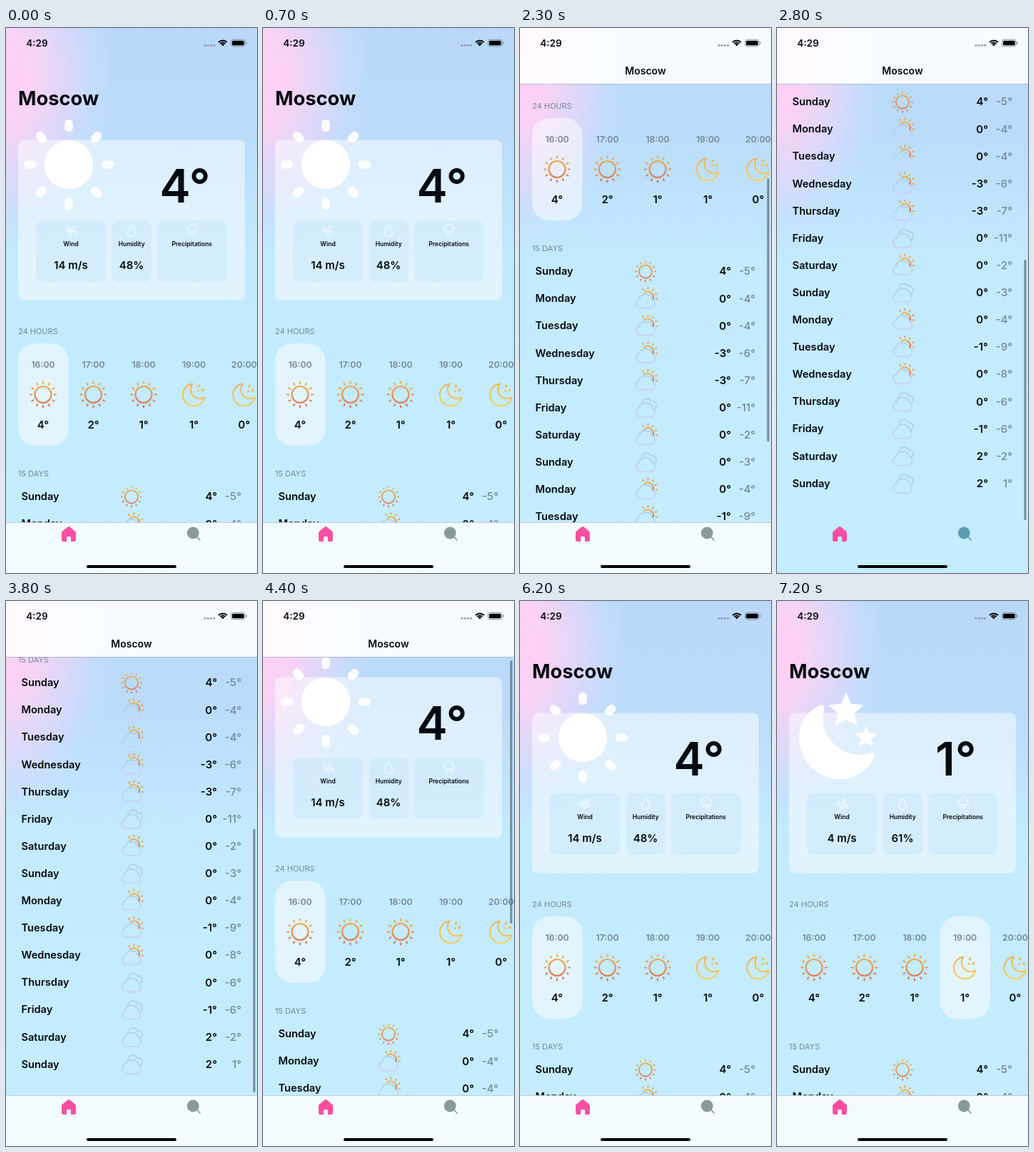
These frames come from a looping animation (352 px wide and 762 px high, 8 s). An HTML page:

```html
<!DOCTYPE html>
<html lang="en">
<head>
<meta charset="utf-8">
<title>Weather</title>
<style>
  html, body { margin: 0; width: 100%; height: 100%; overflow: hidden; background: #c5edff; }
  svg { display: block; width: 352px; height: 762px; font-family: Inter, "Liberation Sans", sans-serif; }
</style>
</head>
<body>
<svg id="stage" viewBox="0 0 352 762"></svg>
<script>
const LOOP = 8000;
const GREY = '#75879a';

// Markup helpers: text is centred vertically on y.
const text = (x, y, str, size, weight = 600, anchor = 'middle', fill = '#050a10') =>
  `<text x="${x}" y="${y + size * 0.362}" font-size="${size}" font-weight="${weight}" text-anchor="${anchor}" fill="${fill}">${str}</text>`;
const rect = (x, y, w, h, r, fill, more = '') =>
  `<rect x="${x}" y="${y}" width="${w}" height="${h}" rx="${r}" fill="${fill}" ${more}/>`;
const line = (d, stroke, width, more = '') =>
  `<path d="${d}" fill="none" stroke="${stroke}" stroke-width="${width}" stroke-linecap="round" stroke-linejoin="round" ${more}/>`;
const at = (x, y, body, scale = 1) =>
  `<g transform="translate(${x} ${y}) scale(${scale})">${body}</g>`;
const polar = (r, deg) => {
  const a = deg * Math.PI / 180;
  return `${(r * Math.cos(a)).toFixed(2)},${(r * Math.sin(a)).toFixed(2)}`;
};
const rays = (from, to, angles) => angles.map(a => `M${polar(from, a)}L${polar(to, a)}`).join('');
const range = n => [...Array(n).keys()];
const star = (x, y, r) => {
  const points = range(10).map(i => polar(i % 2 ? r * 0.46 : r, i * 36 - 90)).join(' ');
  return at(x, y, `<polygon points="${points}" fill="#fff" stroke="#fff" stroke-linejoin="round"/>`);
};

// Forecast icons, centred on 0,0
const CLOUD = 'M-8,13H8A6.5 6.5 0 0 0 10,1A10 10 0 0 0 -9,0A7 7 0 0 0 -8,13Z';
const sun = line('M11.5,0A11.5 11.5 0 1 1 -11.5,0A11.5 11.5 0 1 1 11.5,0Z' +
  rays(15.8, 18, range(12).map(i => i * 30)), 'url(#warm)', 2.2);
const moon = line('M-2,-15A15.5 15.5 0 1 0 15,4A13 13 0 0 1 -2,-15Z', 'url(#gold)', 2.1) +
  [[7, -12, 1.9], [12, -6, 1.9], [6, -5, 1.6]].map(([x, y, r]) => `<circle cx="${x}" cy="${y}" r="${r}" fill="#f3bd57"/>`).join('');
const cloud = line(CLOUD, 'url(#mist)', 1.6);
const icons = {
  sun: at(0, 0, sun, 0.79),
  partly: cloud + at(3, -2,
    line(`M${polar(8, -125)}A8 8 0 0 1 ${polar(8, 15)}`, 'url(#warm)', 2.1) +
    line(rays(12, 13.2, [-120, -88, -55, -22, 10]), '#eba65a', 2.2)),
  cloudy: line('M-5,-7A7 7 0 0 1 8,-9A5.6 5.6 0 0 1 11,2', '#b1cfe8', 1.6) + cloud
};

// Large card artwork
const bigSun = `<g fill="#fff"><circle cx="88" cy="191" r="34.2"/>` + range(8).map(i =>
  rect(82.2, 128, 11.6, 17, 5.5, '#fff', `opacity=".92" transform="rotate(${i * 45} 88 191)"`)).join('') + '</g>';
const bigMoon = '<path fill="#fff" d="M60,146C40,155 31,173 31,191C31,224 57,249 89,249C110,249 128,236 136,219' +
  'C138,214 134,211 129,213C110,219 92,212 80,200C66,187 62,170 66,152C67,147 64,144 60,146Z"/>' +
  star(97, 153.5, 25) + star(125, 190.5, 15.5);

const HOUR_X = [52, 122.5, 193, 263.5, 334];
const reading = (id, art, degrees, wind, humidity, hour) => `<g id="${id}">` + art +
  text(251, 220, degrees, 65) + text(91, 331.5, wind, 15) + text(176, 331.5, humidity, 15) +
  rect(HOUR_X[hour] - 35, 441, 70.5, 143, 24, '#fff', 'fill-opacity=".52"') + '</g>';

const panel = (x, w, label) => rect(x, 269, w, 86, 9, '#b9e0fa', 'fill-opacity=".36"') +
  text(x + w / 2, 302, label, 8.5);
const smallIcons =
  at(91, 283, line('M-7,-1.5H3A2 2 0 1 0 1,-4M-5,-4H-3.5M-7,1H5.5A2 2 0 1 1 4,4M-4,3.5H0A1.7 1.7 0 1 1 -1.5,6', '#fff', 1.1)) +
  at(176, 283, line('M0,-7.5C3,-3.5 5.5,0 5.5,3A5.5 5.5 0 0 1 -5.5,3C-5.5,0 -3,-3.5 0,-7.5Z', '#fff', 1.1)) +
  at(261, 282, line(CLOUD, '#fff', 2, 'transform="translate(0 -4) scale(.55)"') +
    line('M-2.5,5.5L-3.5,7.5M1,6L0,8.5M4.5,5.5L3.5,7.5', '#fff', 1.1));

const hours = ['16:00 4', '17:00 2', '18:00 1', '19:00 1', '20:00 0'].map((entry, i) => {
  const [time, degrees] = entry.split(' ');
  return text(HOUR_X[i], 470.5, time, 12.3, 600, 'middle', GREY) +
    at(HOUR_X[i], 512.5, i < 3 ? sun : moon) + text(HOUR_X[i], 555, degrees + '°', 15);
}).join('');

const week = ['Sunday', 'Monday', 'Tuesday', 'Wednesday', 'Thursday', 'Friday', 'Saturday'];
const highs = [4, 0, 0, -3, -3, 0, 0, 0, 0, -1, 0, 0, -1, 2, 2];
const lows = [-5, -4, -4, -6, -7, -11, -2, -3, -4, -9, -8, -6, -6, -2, 1];
const sky = 'sppppcpcpppcccc';
const kinds = { s: 'sun', p: 'partly', c: 'cloudy' };
const days = highs.map((high, i) => {
  const y = 655 + i * 38.1;
  return text(21.5, y, week[i % 7], 14.6, 600, 'start') + at(176, y + 0.5, icons[kinds[sky[i]]]) +
    text(296, y, high + '°', 15, 600, 'end') + text(330, y, lows[i] + '°', 15, 500, 'end', GREY);
}).join('');

const gradient = (id, top, bottom) =>
  `<linearGradient id="${id}" x2="0" y2="1"><stop stop-color="${top}"/><stop offset="1" stop-color="${bottom}"/></linearGradient>`;

const stage = document.getElementById('stage');
stage.innerHTML = `<defs>
  ${gradient('warm', '#efb552', '#da7660')}${gradient('gold', '#f2b255', '#f3d069')}${gradient('mist', '#abcdeb', '#d2cdec')}
  <linearGradient id="air" x2="0" y2="1">
    <stop stop-color="#bad9fa"/><stop offset=".2" stop-color="#badcfa"/>
    <stop offset=".42" stop-color="#c3eafe"/><stop offset="1" stop-color="#c5edff"/>
  </linearGradient>
  <radialGradient id="blush">
    <stop stop-color="#ffcff3"/><stop offset=".3" stop-color="#fbd2f5" stop-opacity=".95"/>
    <stop offset=".65" stop-color="#e3d8fa" stop-opacity=".65"/><stop offset="1" stop-color="#c4e0fc" stop-opacity="0"/>
  </radialGradient>
  <clipPath id="view"><rect id="window" width="352"/></clipPath></defs>` +
  rect(0, 0, 352, 762, 0, 'url(#air)') +
  '<ellipse cx="-6" cy="70" rx="160" ry="245" fill="url(#blush)"/>' +
  `<g clip-path="url(#view)"><g id="content">
    <g id="heading">${text(17, 98.5, 'Moscow', 27.3, 700, 'start')}</g>` +
    rect(17, 156.5, 318, 224, 8, '#fff', 'fill-opacity=".5"') +
    panel(42, 98, 'Wind') + panel(148.5, 55.5, 'Humidity') + panel(212, 97.5, 'Precipitations') + smallIcons +
    reading('day', bigSun, '4°', '14 m/s', '48%', 0) + reading('night', bigMoon, '1°', '4 m/s', '61%', 3) +
    text(17, 424, '24 HOURS', 11, 400, 'start', GREY) + hours +
    text(17, 623.5, '15 DAYS', 11, 400, 'start', GREY) + days + '</g></g>' +
  `<g id="nav">${rect(0, 0, 352, 78, 0, '#fff', 'fill-opacity=".88"')}${rect(0, 78, 352, 0.7, 0, '#a3b2be')}</g>` +
  `<g id="title">${text(176, 59.5, 'Moscow', 14)}</g>` +
  `<g id="tab">${rect(0, 691, 352, 71, 0, '#fff', 'fill-opacity=".8"')}${rect(0, 691, 352, 0.7, 0, '#a9bac3')}</g>` +
  rect(346.5, 0, 3, 0, 1.5, '#566674', 'id="thumb"') +
  // Status bar
  text(43.5, 21, '4:29', 13.5) +
  range(4).map(i => `<circle cx="${279 + i * 4.2}" cy="24.3" r="1.5" fill="#8f9bab"/>`).join('') +
  at(304, 25.5, '<path d="M0,0L-2.3,-2.4A3.3 3.3 0 0 1 2.3,-2.4Z"/>' +
    [4.9, 8.1].map(r => `<path d="M${polar(r, -137)}A${r} ${r} 0 0 1 ${polar(r, -43)}" fill="none" stroke="#000" stroke-width="2"/>`).join('')) +
  rect(315.5, 16.2, 19.8, 9.6, 3, 'none', 'stroke="#7d8793" stroke-width=".9"') +
  rect(317, 17.7, 16.8, 6.6, 1.6, '#000') + rect(336.3, 19.3, 1.3, 3.4, 0.6, '#7d8793') +
  // Tab icons and home indicator
  '<path fill="#fb4fa2" d="M86.5,697.6Q88,696.4 89.5,697.6L97,703.8Q98,704.7 98,706V715.5Q98,718 95.5,718H91V712.5Q91,711 89.5,711H86.5Q85,711 85,712.5V718H80.5Q78,718 78,715.5V706Q78,704.7 79,703.8Z"/>' +
  `<g id="search"><circle cx="262.3" cy="706" r="8.4"/>${line('M268.5,712.2L272,715.8', 'currentColor', 1.7)}</g>` +
  rect(113, 751, 126, 4, 2, '#000');

const parts = {};
stage.querySelectorAll('[id]').forEach(el => parts[el.id] = el);
const set = (id, attrs) => {
  for (const key in attrs) parts[id].setAttribute(key, attrs[key]);
};

// Scroll offsets at 100 ms spacing: flick down with bounce, flick up with bounce
const flickDown = [54, 130, 225, 315, 395, 460, 510, 541, 552, 551, 549, 547.5, 546.5, 546];
const flickUp = [541, 480, 395, 295, 195, 110, 50, 15, -4, -7, -5.5, -3.5, -2, -1, -0.4, 0];
const pick = (list, t, start) => list[Math.min(list.length - 1, (t - start) / 100)];
const scrollAt = t => t < 2000 ? 0 : t < 3800 ? pick(flickDown, t, 2000) : pick(flickUp, t, 3800);
const ramp = (t, a, b) => Math.max(0, Math.min(1, (t - a) / (b - a)));

function draw(ms) {
  const t = Math.floor(ms % LOOP / 100) * 100;
  const s = scrollAt(t);
  const leaving = 1 - ramp(t, 4400, 4600);
  const collapsed = t >= 2000 && t <= 4400;
  const atEnd = s > 543;

  set('content', { transform: `translate(0 ${-s})` });
  set('heading', { transform: `translate(17 98.5) scale(${1 + Math.max(0, -s) / 550}) translate(-17 -98.5)` });
  set('window', { y: collapsed ? 78 : 0, height: collapsed ? 613 : 691 });
  set('nav', { opacity: t < 2000 ? 0 : leaving });
  set('title', { opacity: Math.min(ramp(t, 1965, 2200), leaving) });
  set('tab', { opacity: atEnd ? 0 : 1 });
  const tint = atEnd ? '#5c9db5' : '#8a9999';
  set('search', { fill: tint, color: tint });

  const top = Math.max(81, 59 + 0.48 * s);
  const bottom = s < 46 ? 431 + 0.37 * s : Math.min(688, 427 + 0.48 * s);
  const shown = t < 2000 ? 0 : t < 3800 ? 1 - ramp(t, 3000, 3300) : 1 - ramp(t, 5000, 5300);
  set('thumb', { y: top, height: bottom - top, opacity: shown * 0.72 });

  const night = ramp(t, 6800, 7200);
  set('day', { opacity: 1 - night });
  set('night', { opacity: night });
}

const start = performance.now();
function tick() {
  draw(performance.now() - start);
  requestAnimationFrame(tick);
}
tick();
</script>
</body>
</html>
```
